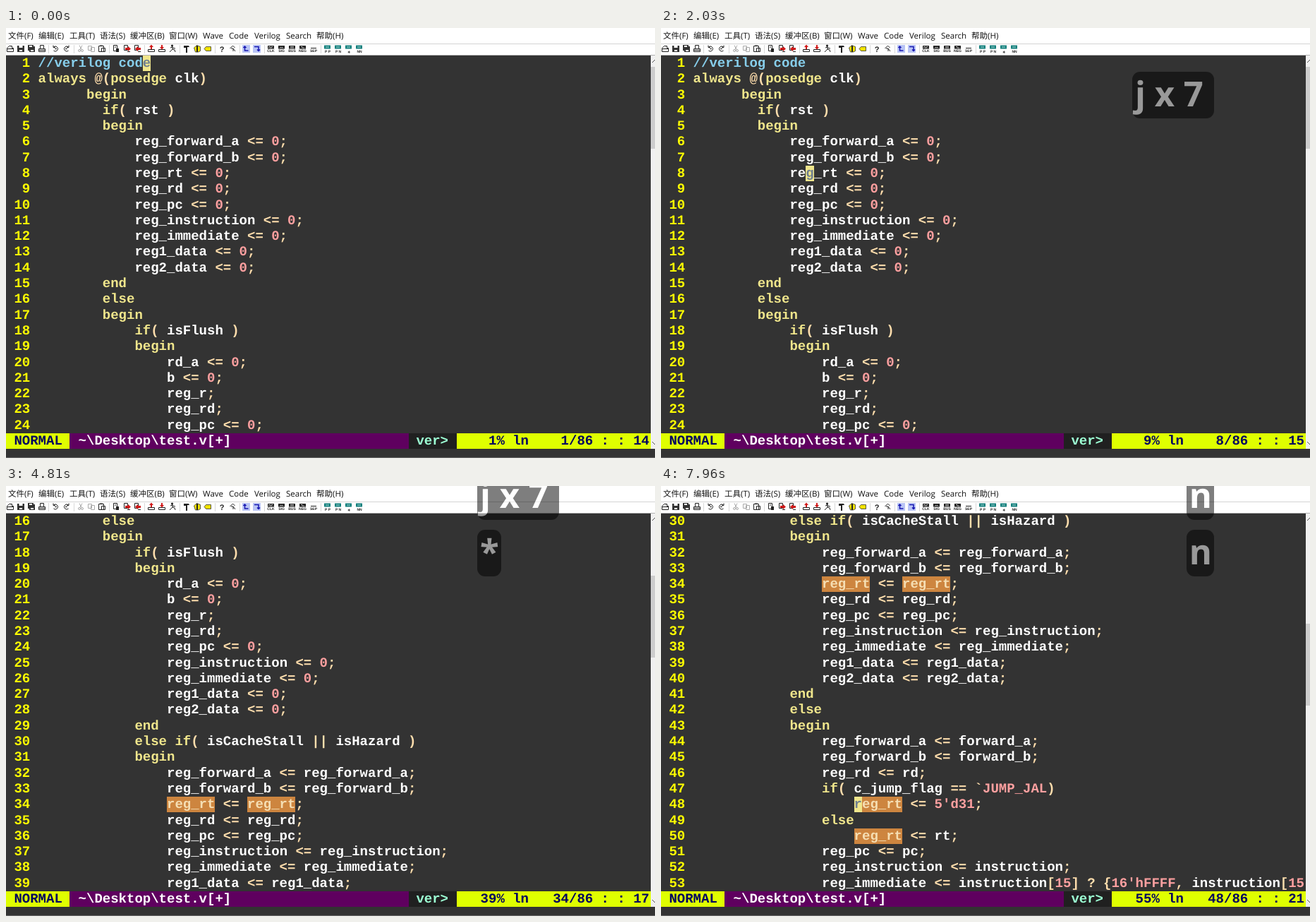
Recreate the animation shown at these times as an HTML page. Size 920 px wide and 609 px high, loop 8000 ms.

```html
<!DOCTYPE html>
<html lang="zh-CN">
<head>
<meta charset="utf-8">
<title>Editor search</title>
<style>
  html, body { margin: 0; width: 100%; height: 100%; overflow: hidden; }
  body { position: relative; background: #333; text-rendering: geometricPrecision; }
  #stage { position: absolute; left: 0; top: 0; width: 920px; height: 609px; overflow: hidden; background: #333; }
  #stage div, #stage svg, .code span { position: absolute; }

  #menu { left: 0; top: 0; width: 920px; height: 39px; background: #fff; }
  #menu span {
    position: absolute; top: 3px; white-space: pre; color: #111;
    font: 11.5px/17px "Open Sans", "Noto Sans CJK SC", "Noto Sans CJK", sans-serif;
  }
  #icons { left: 0; top: 0; }
  #icons .l { fill: none; stroke: #222; }
  #icons .g { fill: none; stroke: #aaa; }
  #icons .r { fill: #d01818; }
  #icons .y { fill: #f2e200; stroke: #333; stroke-width: .8; }
  #icons text { font: bold 5px "Liberation Sans", sans-serif; text-anchor: middle; fill: #222; }

  .code {
    font: bold 19px/22px "Courier New", "Liberation Mono", monospace;
    white-space: pre; color: #fff; height: 22px;
  }
  #rows { left: 0; top: 0; width: 914px; height: 574px; overflow: hidden; }
  .code span { top: 0; height: 22px; }
  .num { color: #ff0; }
  .rem { color: #87ceeb; }
  .key { color: #f0e68c; }
  .op { color: #ffdead; }
  .lit { color: #ffa0a0; }
  .found .hit { background: #cd853f; color: #f5deb3; }
  #cursor { width: 11.4px; background: #f0e68c; color: #708090; }

  .bar { top: 574px; }
  .mode { background: #dfff00; color: #00005f; }
  #cmd { left: 0; top: 596px; }
  #edge { left: 0; top: 608px; width: 920px; height: 1px; background: #666; }

  #scroll { left: 914px; top: 39px; width: 6px; height: 557px; background: #f0f0f0; }
  #thumb { left: 0; width: 6px; height: 116px; background: #cdcdcd; }

  #stage #keys {
    right: 136px; bottom: 481px; opacity: .5;
    display: flex; flex-direction: column; align-items: flex-start; gap: 14px;
  }
  #stage #keys div {
    position: static; box-sizing: border-box; height: 66px; padding: 0 3px 0 4px;
    border-radius: 11px; background: #000; color: #fff; white-space: pre;
    font: bold 49px/62px "Open Sans", "Noto Sans", sans-serif;
  }
  #stage #keys .many { width: 116px; }
</style>
</head>
<body>
<div id="stage">
  <div id="menu">
    <span style="left:3px">文件(F)</span>
    <span style="left:46px">编辑(E)</span>
    <span style="left:90px">工具(T)</span>
    <span style="left:133px">语法(S)</span>
    <span style="left:176px">缓冲区(B)</span>
    <span style="left:231px">窗口(W)</span>
    <span style="left:279px">Wave</span>
    <span style="left:316px">Code</span>
    <span style="left:352px">Verilog</span>
    <span style="left:397px">Search</span>
    <span style="left:440px">帮助(H)</span>
    <svg id="icons" width="920" height="39">
      <path d="M0 22.5H920" stroke="#d4d4d4"/>
      <path d="M0 38.5H920" stroke="#b0b0b0"/>
      <path d="M60.5 24v12M96.5 24v12M146.5 24v12M196.5 24v12M246.5 24v12M296.5 24v12M331.5 24v12M366.5 24v12M446.5 24v12" stroke="#d8d8d8"/>
      <!-- files -->
      <path class="l" d="M1.5 33.5v-5l3-3h4v3h2v5z M2 29.5h8"/>
      <path d="M16 25h10v9h-10z" fill="#333"/><path d="M18.500 25h5v3h-5zM19 31h4v2h-4z" fill="#fff"/>
      <path d="M31 24h8v2h2v8h-8v-2h-2z" fill="#333"/><path d="M33 25h4v2h-4zM35 31h4v2h-4z" fill="#fff"/>
      <path class="l" d="M48.500 29v-4.500h5v4.500M46.500 29.500h9v4h-9zM47 31.500h8"/>
      <!-- undo, redo -->
      <path class="l" d="M67.500 27a3.500 3.500 0 1 1 0 5M67 24.500v3h3M69 29.500h3"/>
      <path class="l" d="M88.500 27a3.500 3.500 0 1 0 0 5M89 24.500v3h-3M84 29.500h3"/>
      <!-- clipboard -->
      <path class="g" d="M104 24.500l3 6M108 24.500l-3 6M102.500 32a1.500 1.500 0 1 0 3 0a1.500 1.500 0 1 0-3 0M106.500 32a1.500 1.500 0 1 0 3 0a1.500 1.500 0 1 0-3 0"/>
      <path class="g" d="M116.500 25.500h5v6h-5zM120.500 27.500h5v6h-5z"/>
      <path class="l" d="M131.500 25.500h7v8h-7zM135.500 28.500h5v5h-5zM133 25h4"/>
      <!-- find -->
      <path class="l" d="M152.500 24.500h5v8h-5zM154 27h2"/><path d="M156 29h4v5h-4z" fill="#222"/>
      <path class="l" d="M167.500 24.500h5v7h-5z"/><path class="r" d="M169 28h4v-2l4 3.500-4 3.500v-2h-4z"/><path class="l" d="M172 33.500h4"/>
      <path class="l" d="M182.500 24.500h5v7h-5z"/><path class="r" d="M191 28h-4v-2l-4 3.500 4 3.500v-2h4z"/><path class="l" d="M187 33.500h4"/>
      <!-- sessions -->
      <path class="l" d="M201.500 30.500h9v3h-9z"/><path class="r" d="M205 30v-3h-2l3-3.500 3 3.500h-2v3z"/>
      <path class="l" d="M216.500 30.500h9v3h-9z"/><path class="r" d="M220 24v3h-2l3 3.500 3-3.500h-2v-3z"/>
      <path class="l" d="M236 27l-3 1M236 26v4l-4 4M236 30l3 1 1 3M236 28l4 1"/><circle cx="235.500" cy="25" r="1.600" fill="#222"/>
      <!-- build -->
      <path d="M252 25h7l1 2h-3v8h-2v-7h-3z" fill="#222"/>
      <path class="y" d="M266.500 28l4-3.500 5 2v6l-3 1.500h-4z"/><path d="M270 25h2v9h-2z" fill="#222"/>
      <path class="y" d="M281 29.500l2.500-3h7v6h-7z"/>
      <!-- help -->
      <text x="306" y="34" style="font-size:11px">?</text>
      <path class="l" d="M317.500 29l4-4 3 3M319 29h3v4M322 29l3 4"/>
      <!-- blocks -->
      <path d="M335 24h11v11h-11zM350 24h11v11h-11z" fill="#b9c4f5"/>
      <path d="M338.500 26v6h5M336.500 28l2-2 2 2M352 26.500h6v6M356 30.500l2 2 2-2" fill="none" stroke="#1717b0" stroke-width="1.500"/>
      <!-- signals -->
      <path d="M371 25h9v4.500h-9zM386 25h9v4.500h-9zM401 25h9v4.500h-9zM416 25h9v4.500h-9z" fill="#222"/>
      <path d="M372.500 28v-1.500h2v1.500h2v-1.500h2M388 27.500h5M403 26.500h5M403 28h5M418 26.500h2v1.500h3" fill="none" stroke="#fff" stroke-width=".6"/>
      <path d="M432 28.500h8" stroke="#222"/>
      <text x="375.500" y="34">CLK</text><text x="390.500" y="34">SIG</text><text x="405.500" y="34">BUS</text>
      <text x="420.500" y="34">NEG</text><text x="436" y="34">SEP</text>
      <path d="M451 24.500h9v5h-9zM466 24.500h9v5h-9zM481 24.500h9v5h-9zM496 24.500h9v5h-9z" fill="#137f7c"/>
      <path d="M453 27h5M468 27h5M483 27h5M498 27h5" stroke="#d7f1ee" stroke-width=".8"/>
      <text x="456" y="34.500">P P</text><text x="471" y="34.500">P N</text><text x="486" y="36">✳</text><text x="501" y="34.500">NN</text>
    </svg>
  </div>

  <div id="rows"></div>
  <div id="cursor" class="code"></div>

  <div class="code bar mode" style="left:0;width:90px"></div>
  <div class="code bar" style="left:90px;width:481px;background:#5f005f"></div>
  <div class="code bar" style="left:571px;width:68px;background:#202020;color:#9cffd3"></div>
  <div class="code bar mode" style="left:639px;width:275px"></div>
  <div id="cmd" class="code"></div>

  <div id="scroll">
    <svg width="6" height="557" fill="none" stroke="#555"><path d="M2 10l4-4M2 547l4 4"/></svg>
    <div id="thumb"></div>
  </div>
  <div id="edge"></div>
  <div id="keys"></div>
</div>

<script>
const CELL = 11.4, ROW = 22.29, TOP = 39, GUTTER = 4, VISIBLE = 24, TOTAL = 86, LOOP = 8000;
const $ = id => document.getElementById(id);

// A leading number is the indent of that line and the ones after it.
let indent = 0;
const lines = `0 //verilog code
always @(posedge clk)
6 begin
8 if( rst )
begin
12 reg_forward_a <= 0;
reg_forward_b <= 0;
reg_rt <= 0;
reg_rd <= 0;
reg_pc <= 0;
reg_instruction <= 0;
reg_immediate <= 0;
reg1_data <= 0;
reg2_data <= 0;
8 end
else
begin
12 if( isFlush )
begin
16 rd_a <= 0;
b <= 0;
reg_r;
reg_rd;
reg_pc <= 0;
reg_instruction <= 0;
reg_immediate <= 0;
reg1_data <= 0;
reg2_data <= 0;
12 end
else if( isCacheStall || isHazard )
begin
16 reg_forward_a <= reg_forward_a;
reg_forward_b <= reg_forward_b;
reg_rt <= reg_rt;
reg_rd <= reg_rd;
reg_pc <= reg_pc;
reg_instruction <= reg_instruction;
reg_immediate <= reg_immediate;
reg1_data <= reg1_data;
reg2_data <= reg2_data;
12 end
else
begin
16 reg_forward_a <= forward_a;
reg_forward_b <= forward_b;
reg_rd <= rd;
if( c_jump_flag == \`JUMP_JAL)
20 reg_rt <= 5'd31;
16 else
20 reg_rt <= rt;
16 reg_pc <= pc;
reg_instruction <= instruction;
reg_immediate <= instruction[15] ? {16'hFFFF, instruction[15`.split('\n').map(s => {
  const [, n, text] = s.match(/^(?:(\d+) )?(.*)$/);
  if (n) indent = +n;
  return ' '.repeat(indent) + text;
});

const TOKEN = /\/\/.*|\d+'[hd][\dA-F]+|\b[A-Z_]{3,}\b|\w+|[^\s\w]+/g;
const KEYWORD = /^(always|posedge|begin|end|if|else)$/;

function kind(s) {
  if (s.startsWith('//')) return 'rem';
  if (KEYWORD.test(s)) return 'key';
  if (/^\d|^[A-Z_]{3,}$/.test(s)) return 'lit';
  if (s === 'reg_rt') return 'hit';
  return /^\w/.test(s) ? 'id' : 'op';
}

function put(parent, text, x, cls) {
  const el = document.createElement('span');
  el.textContent = text;
  el.className = cls;
  el.style.left = x + 'px';
  parent.append(el);
}

const rowY = i => Math.round(TOP + i * ROW);

function drawRows(top) {
  $('rows').replaceChildren();
  for (let i = 0; i < VISIBLE; i++) {
    const n = top + i, row = document.createElement('div');
    row.className = 'code';
    row.style.top = rowY(i) + 'px';
    put(row, String(n), (GUTTER - 1 - String(n).length) * CELL, 'num');
    for (const m of lines[n - 1].matchAll(TOKEN)) put(row, m[0], (GUTTER + m.index) * CELL, kind(m[0]));
    $('rows').append(row);
  }
  $('thumb').style.top = 16 + (top - 1) * 4.83 + 'px';
}

// time, top line, cursor line, cursor column
const moves = [
  [0, 1, 1, 14], [130, 1, 2, 15], [360, 1, 3, 11], [670, 1, 4, 15], [1160, 1, 5, 13],
  [1470, 1, 6, 15], [1750, 1, 7, 15], [2030, 1, 8, 15],
  [3450, 16, 34, 17], [5610, 16, 34, 27], [7620, 30, 48, 21]
];
const hidden = [
  [2710, 2960], [3360, 3450], [4130, 4380], [4810, 5060],
  [5460, 5610], [6290, 6540], [6910, 7190], [7560, 7620]
];
const presses = [
  [0], [60, 'j'], [360, 'j x 2'], [670, 'j x 3'], [1160, 'j x 4'], [1470, 'j x 5'],
  [1750, 'j x 6'], [2030, 'j x 7'], [3420, 'j x 7', '*'], [5610, 'j x 7', '*', 'n'],
  [7620, 'j x 7', '*', 'n', 'n'], [7960, 'n', 'n']
];
const messages = [[3420, 3450], [5610, 7620]];

const latest = (list, t) => list.findLast(e => e[0] <= t);
const within = (list, t) => list.some(([a, b]) => t >= a && t < b);

const bars = document.querySelectorAll('.bar');
function words(el, text, col) {
  el.replaceChildren();
  for (const m of text.matchAll(/\S+/g)) put(el, m[0], (col + m.index) * CELL - el.offsetLeft, '');
}
words(bars[0], 'NORMAL', 1);
words(bars[1], '~\\Desktop\\test.v[+]', 9);
words(bars[2], 'ver>', 51);
words($('cmd'), '/\\<reg_rt\\>', 0);

function showMove([time, top, line, col]) {
  drawRows(top);
  $('rows').classList.toggle('found', time >= 3450);
  const cur = $('cursor');
  cur.textContent = lines[line - 1][col - 1];
  cur.style.left = (GUTTER + col - 1) * CELL + 'px';
  cur.style.top = rowY(line - top) + 'px';
  const pct = String(Math.floor(line * 100 / TOTAL)).padStart(3);
  words(bars[3], ` ${pct}% ln ${String(line).padStart(4)}/${TOTAL} : : ${col}`, 57);
}

function showKeys([, ...keys]) {
  $('keys').replaceChildren(...keys.map(k => {
    const box = document.createElement('div');
    box.textContent = k;
    if (k.length > 1) box.className = 'many';
    return box;
  }));
}

let move, press;
const start = performance.now();
function frame() {
  const t = (performance.now() - start) % LOOP;
  const m = latest(moves, t), p = latest(presses, t);
  if (m !== move) showMove(move = m);
  if (p !== press) showKeys(press = p);
  $('cursor').style.visibility = within(hidden, t) ? 'hidden' : 'visible';
  $('cmd').style.visibility = within(messages, t) ? 'visible' : 'hidden';
  requestAnimationFrame(frame);
}
frame();
</script>
</body>
</html>
```
